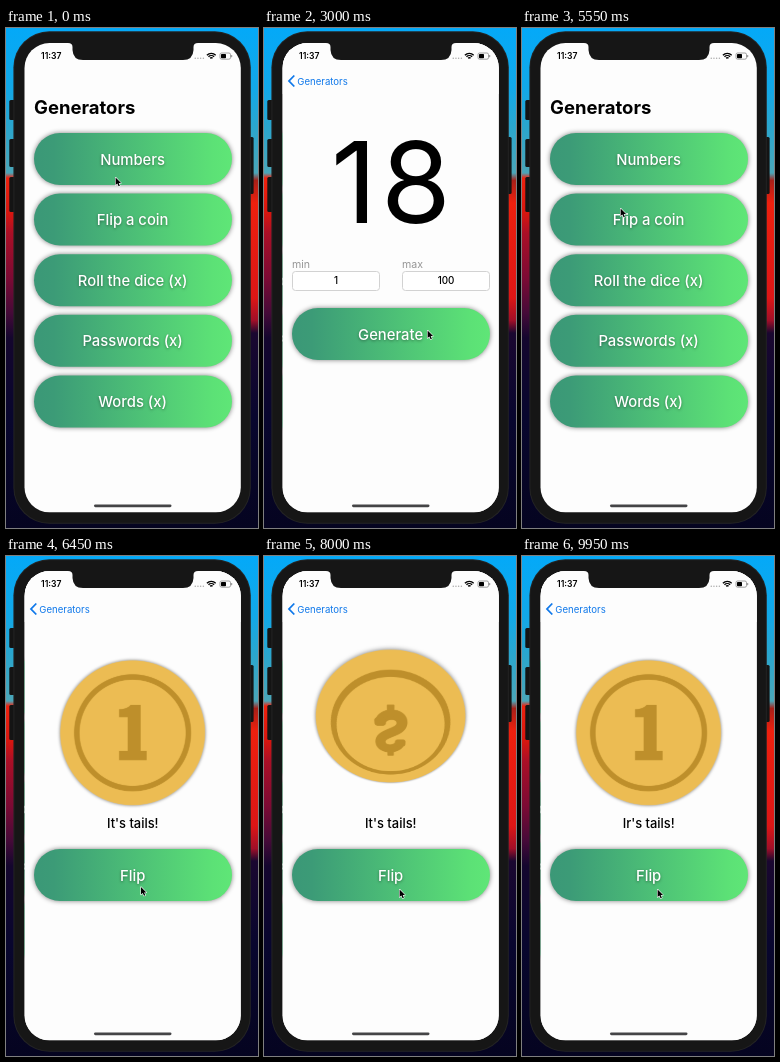
Animation, 252 px wide and 500 px high, one loop 10000 ms. Source, as an HTML page with a canvas:

```html
<!DOCTYPE html>
<html lang="en">
<head>
<meta charset="utf-8">
<title>Generators</title>
<style>
  html, body { margin: 0; width: 100%; height: 100%; overflow: hidden; background: #06051f; }
  canvas { display: block; }
</style>
</head>
<body>
<canvas id="stage" width="252" height="500"></canvas>
<script>
const ctx = document.getElementById('stage').getContext('2d');
const LOOP = 10000;
const SCREEN = { x: 18.5, y: 15, w: 216.3, h: 469.3 };
const PAGE = '#fdfdfd', GOLD = '#ecbc53', BRONZE = '#be8f2b', BLUE = '#0f78ea';
const MENU = ['Numbers', 'Flip a coin', 'Roll the dice (x)', 'Passwords (x)', 'Words (x)'];

const numberTaps = [2050, 2500, 3400, 3800];
const numberSteps = [[0, '0'], [2080, '57'], [2530, '18'], [3430, '83'], [3830, '42']];
const cursorPath = [
  [0, 109, 149], [850, 109, 149], [1150, 108, 133], [1350, 108, 132],
  [1900, 163, 302], [4050, 163, 302], [4500, 40, 52], [4850, 40, 52],
  [5350, 98, 180], [5900, 98, 180], [6500, 135, 333], [LOOP, 135, 333]
];
const flips = [
  { start: 6921, length: 1200 },
  { start: 8615, length: 1335 }
];

const clamp = v => Math.max(0, Math.min(1, v));
const ease = v => (1 - Math.cos(Math.PI * clamp(v))) / 2;

// Critically damped spring used by the page transitions
function spring(ms) {
  if (ms <= 0) return 0;
  const k = ms * 0.0183;
  return 1 - (1 + k) * Math.exp(-k);
}

function cursorAt(t) {
  const i = cursorPath.findIndex(k => k[0] > t);
  const [t0, x0, y0] = cursorPath[i - 1], [t1, x1, y1] = cursorPath[i];
  const p = ease((t - t0) / (t1 - t0));
  return [x0 + (x1 - x0) * p, y0 + (y1 - y0) * p];
}

function pressAlpha(t, taps) {
  return taps.reduce((a, tap) => a - 0.6 * clamp(1 - Math.abs(t - tap) / 150), 1);
}

function roundRect(x, y, w, h, r, fill) {
  ctx.beginPath();
  ctx.roundRect(x, y, w, h, r);
  if (fill) {
    ctx.fillStyle = fill;
    ctx.fill();
  }
}

function text(str, x, y, size, color, { align = 'left', weight = 400 } = {}) {
  ctx.font = `${weight} ${size}px Inter, sans-serif`;
  ctx.textAlign = align;
  ctx.fillStyle = color;
  ctx.fillText(str, x, y);
}

function shadow(color, blur, dy) {
  ctx.shadowColor = color;
  ctx.shadowBlur = blur;
  ctx.shadowOffsetY = dy;
}

function button(label, y, alpha = 1) {
  const g = ctx.createLinearGradient(28, 0, 226, 0);
  g.addColorStop(0, '#3b9877');
  g.addColorStop(0.1, '#3c9b77');
  g.addColorStop(0.9, '#5ce176');
  g.addColorStop(1, '#5fe677');
  ctx.save();
  ctx.globalAlpha *= alpha;
  shadow('rgba(0,0,0,.5)', 5, 0);
  roundRect(28, y, 198, 52, 26, g);
  shadow('rgba(0,0,0,.4)', 3, 1);
  text(label, 126.6, y + 31.5, 14.8, '#fff', { align: 'center', weight: 500 });
  ctx.restore();
}

// Coin faces, drawn large and projected row by row
const FACE = 160, DETAIL = 4;
function makeFace(drawSymbol) {
  const face = document.createElement('canvas');
  face.width = face.height = FACE * DETAIL;
  const c = face.getContext('2d');
  c.scale(DETAIL, DETAIL);
  c.translate(FACE / 2, FACE / 2);
  c.save();
  c.shadowColor = 'rgba(0,0,0,.55)';
  c.shadowBlur = 3.5 * DETAIL;
  c.beginPath();
  c.arc(0, 0, 72.4, 0, 7);
  c.fillStyle = GOLD;
  c.fill();
  c.restore();
  c.strokeStyle = c.fillStyle = BRONZE;
  c.lineWidth = 5.5;
  c.beginPath();
  c.arc(0, 0, 55.8, 0, 7);
  c.stroke();
  drawSymbol(c);
  return face;
}

const heads = makeFace(c => c.fill(new Path2D(
  'M-2 -28H8V18H14V27.5H-13.5V18H-5V-15.5H-13.5V-23.5Q-5 -24 -2 -28Z')));

const tails = makeFace(c => {
  c.lineWidth = 10.5;
  c.stroke(new Path2D('M10 -10C10 -22 -10 -23 -10.5 -11C-10.5 1 11 -1 11 11C10.5 23 -10 22 -10 10'));
  c.beginPath();
  c.roundRect(4.5, -17, 11, 9, 3);
  c.roundRect(-15.5, 8, 11, 9, 3);
  c.roundRect(-3.5, -29.5, 7, 12, 1);
  c.roundRect(-3.5, 17.5, 7, 12, 1);
  c.fill();
});

function coin(angle) {
  const cx = 126.6, cy = 176.8, depth = 147, half = FACE / 2;
  const cos = Math.cos(angle), sin = Math.sin(angle);
  const face = cos >= 0 ? heads : tails;
  const faceY = y => y / (cos + y * sin / depth);
  ctx.imageSmoothingQuality = 'high';
  const firstRow = Math.floor(cy) - 100;
  for (let row = firstRow; row < firstRow + 200; row++) {
    const y = row - cy, mid = faceY(y + 0.5);
    if (!(Math.abs(mid) < half)) continue;
    const a = faceY(y), b = faceY(y + 1);
    const top = Math.max(-half, Math.min(a, b)), bottom = Math.min(half, Math.max(a, b));
    if (bottom <= top) continue;
    const w = FACE / (1 - mid * sin / depth);
    ctx.drawImage(face, 0, (top + half) * DETAIL, FACE * DETAIL, (bottom - top) * DETAIL,
      cx - w / 2, row, w, 1);
  }
}

function field(label, value, x) {
  text(label, x, 240, 10.6, '#959595');
  roundRect(x + 0.5, 243.5, 87, 19, 3, '#fff');
  ctx.strokeStyle = '#d2d2d2';
  ctx.lineWidth = 1;
  ctx.stroke();
  text(value, x + 44, 256.4, 9.8, '#000', { align: 'center', weight: 500 });
}

function menuPage(t) {
  MENU.forEach((label, i) => {
    const alpha = i === 0 ? pressAlpha(t, [790]) : i === 1 ? pressAlpha(t, [5760]) : 1;
    button(label, 105 + i * 60.6, alpha);
  });
}

function numbersPage(t) {
  const value = numberSteps.filter(s => s[0] <= t).pop()[1];
  const size = value.length > 1 ? 113 : 133;
  ctx.save();
  ctx.letterSpacing = '4px';
  text(value, 129, 154 + size * 0.3635, size, '#000', { align: 'center' });
  ctx.restore();
  field('min', '1', 28);
  field('max', '100', 138);
  button('Generate', 280, pressAlpha(t, numberTaps));
}

function coinPage(t) {
  const halfTurns = flips.reduce((n, f) => n + 7 * ease((t - f.start) / f.length), 0);
  coin(halfTurns * Math.PI);
  const landed = t >= flips[0].start + flips[0].length;
  text(landed ? "Ir's tails!" : "It's tails!", 126.7, 272, 12.9, '#000', { align: 'center', weight: 500 });
  button('Flip', 293, pressAlpha(t, flips.map(f => f.start - 60)));
}

function header(p) {
  ctx.save();
  ctx.globalAlpha = clamp(1 - p * 1.3);
  text('Generators', 28 - p * 40, 86, 18.5, '#000', { weight: 700 });
  ctx.globalAlpha = p;
  const x = (1 - p) * 50;
  ctx.strokeStyle = BLUE;
  ctx.lineWidth = 1.8;
  ctx.beginPath();
  ctx.moveTo(30.3, 47.5);
  ctx.lineTo(25, 53);
  ctx.lineTo(30.3, 58.5);
  ctx.stroke();
  text('Generators', 33.3 + x, 56.8, 9.6, BLUE);
  ctx.restore();
}

function statusBar() {
  text('11:37', 35, 31.4, 8.6, '#000', { weight: 600 });
  for (let i = 0; i < 4; i++) roundRect(188.5 + i * 2.7, 29.6, 1.5, 1.5, 0.75, '#aaa');
  ctx.strokeStyle = '#000';
  ctx.lineWidth = 1.4;
  for (const r of [1.8, 4, 6.2]) {
    ctx.beginPath();
    ctx.arc(205.3, 31.6, r, -Math.PI * 0.75, -Math.PI * 0.25);
    ctx.stroke();
  }
  roundRect(214, 25, 10.5, 6.2, 1.6);
  ctx.strokeStyle = '#888';
  ctx.lineWidth = 0.8;
  ctx.stroke();
  roundRect(215, 26, 5, 4.2, 0.8, '#000');
  roundRect(225.2, 26.9, 1, 2.4, 0.5, '#888');
}

// Sky over a red forest; the treeline differs on each side of the phone
function wallpaper() {
  const sky = [[0, '#04a9f8'], [0.12, '#12a8e8'], [0.2, '#2ba6cd'], [0.29, '#4aa6b8']];
  const left = [[0.3, '#f0220e'], [0.37, '#d8160f'], [0.41, '#ab0f26'], [0.5, '#7c0a34'],
    [0.57, '#450a38'], [0.62, '#14062e']];
  const right = [[0.305, '#a82018'], [0.35, '#ee200e'], [0.54, '#dc1616'], [0.585, '#a00f28'],
    [0.61, '#1a0730']];
  const night = [[0.78, '#08062e'], [1, '#050420']];
  [left, right].forEach((forest, side) => {
    const g = ctx.createLinearGradient(0, 0, 0, 500);
    [...sky, ...forest, ...night].forEach(s => g.addColorStop(...s));
    ctx.fillStyle = g;
    ctx.fillRect(side * 126, 0, 126, 500);
  });
}

function phoneBody() {
  for (const [y, h] of [[72, 20], [111, 28], [149, 35]]) roundRect(3.3, y, 6, h, 1.5, '#141414');
  roundRect(242, 109, 5.6, 57, 1.5, '#141414');
  roundRect(7.4, 3.3, 237.4, 492.5, 36, '#242424');
  roundRect(8.4, 4.3, 235.4, 490.5, 35, '#161616');
}

function notch() {
  ctx.fillStyle = '#161616';
  ctx.fill(new Path2D('M62 14V15Q66.5 15 66.5 19V22Q67 32 77 32H177Q187 32 187.5 22V19Q187.5 15 192 15V14Z'));
}

function cursor(t) {
  const [x, y] = cursorAt(t);
  ctx.save();
  ctx.translate(x + 0.6, y + 0.5);
  ctx.scale(0.88, 0.88);
  const arrow = new Path2D('M0 0V8.6L2 6.8L3.4 10L4.9 9.4L3.5 6.3H6.2Z');
  ctx.lineJoin = 'round';
  ctx.strokeStyle = '#fff';
  ctx.lineWidth = 1.3;
  ctx.stroke(arrow);
  ctx.fillStyle = '#000';
  ctx.fill(arrow);
  ctx.restore();
}

function render(t) {
  const p = spring(t - 855) * (1 - spring(t - 4750)) + spring(t - 5820);
  const { x, y, w, h } = SCREEN;
  wallpaper();
  phoneBody();

  ctx.save();
  roundRect(x, y, w, h, 25, PAGE);
  ctx.clip();

  ctx.save();
  ctx.translate(-p * w * 0.3, 0);
  menuPage(t);
  ctx.restore();

  if (p > 0.001) {
    ctx.fillStyle = `rgba(0,0,0,${0.12 * p})`;
    ctx.fillRect(x, 66, w, h);
    ctx.save();
    ctx.translate((1 - p) * w, 0);
    ctx.fillStyle = PAGE;
    ctx.fillRect(x, y, w, h);
    (t < 5300 ? numbersPage : coinPage)(t);
    ctx.restore();
    ctx.fillStyle = PAGE;
    ctx.fillRect(x, y, w, 51);
  }

  header(p);
  statusBar();
  roundRect(88, 476.4, 77.5, 2.8, 1.4, '#444446');
  ctx.restore();

  notch();
  cursor(t);
}

function frame() {
  render(performance.now() % LOOP);
  requestAnimationFrame(frame);
}
frame();
</script>
</body>
</html>
```
